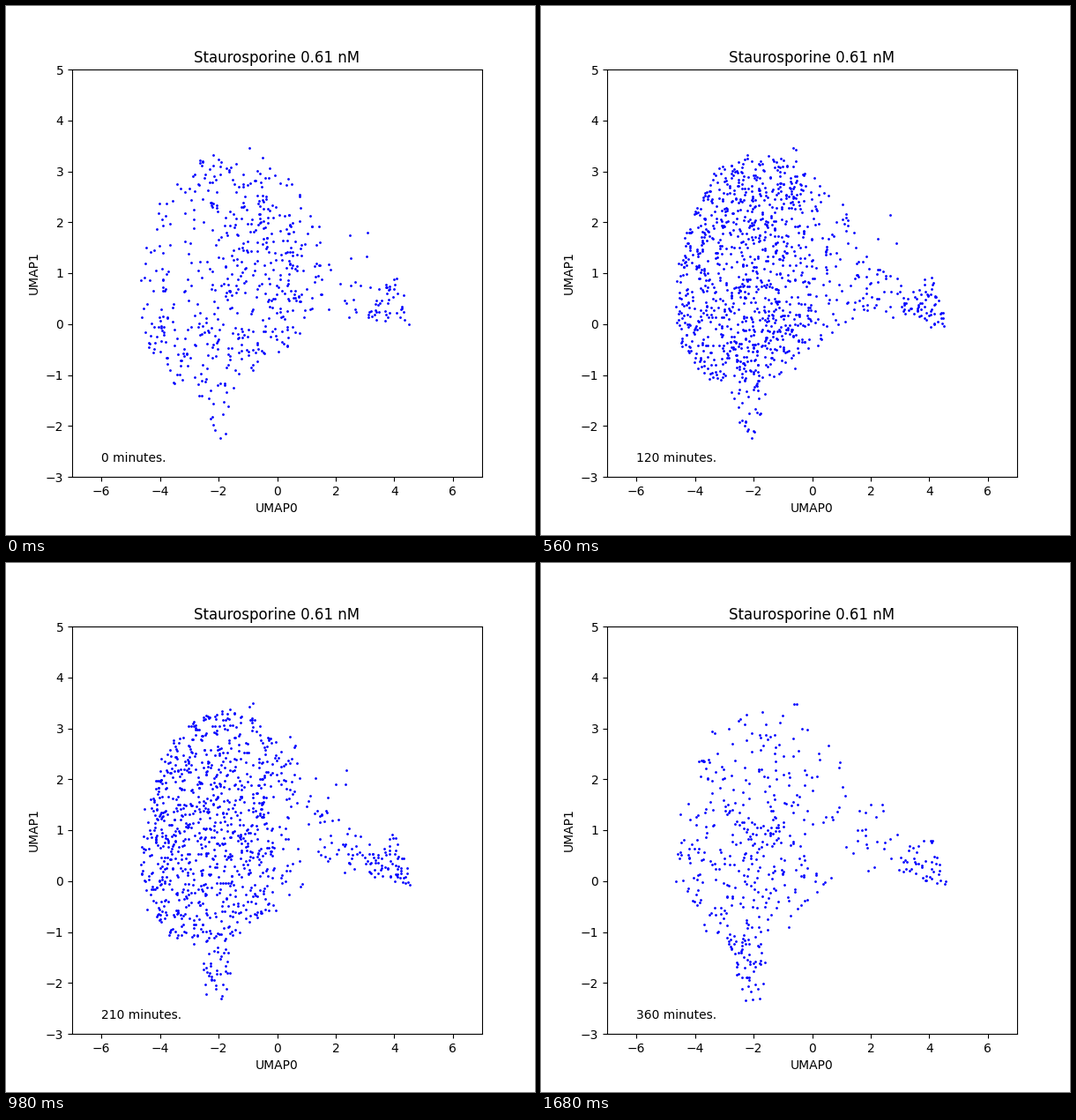
Recreate the animation shown at these times as a matplotlib script. Size 600x600 px, loop 1820 ms.

```python
import numpy as np
import matplotlib.pyplot as plt
from matplotlib.animation import FuncAnimation
from matplotlib.path import Path

FRAMES, INTERVAL = 13, 140
STEP = 30  # minutes per frame
END = STEP * (FRAMES - 1)

BODY = Path([(-4.65, 0.2), (-4.6, 1.2), (-4.05, 2.3), (-3.4, 3.0), (-2.4, 3.3),
             (-0.9, 3.3), (0.5, 2.8), (1.4, 2.0), (1.7, 0.9), (1.2, -0.1),
             (-0.2, -0.6), (-1.2, -1.05), (-3.6, -1.15), (-4.5, -0.4)])
TAIL = Path([(-2.9, -1.1), (-1.5, -1.1), (-1.75, -2.35), (-2.4, -2.3)])
BRIDGE = Path([(1.4, 1.5), (3.2, 0.85), (3.2, 0.2), (1.5, 0.2)])
ARM = Path([(3.0, 0.5), (4.1, 0.95), (4.6, -0.1), (3.1, 0.15)])


def body_weight(p, minute):
    """Thin out the right side over time and the upper left at the start."""
    x, y = p.T
    edge = 1.5 - 1.8 * min(1, minute / 90)
    right = 0.22 + 1 / (1 + np.exp((x - edge) / 0.4))
    hole = np.exp(-((x + 3.2) ** 2 + (y - 1.6) ** 2) / 2)
    return right * (1 - 0.7 * np.exp(-minute / 30) * hole)


def sample(rng, shape, count, weight=None):
    box = shape.get_extents()
    p = rng.uniform(box.min, box.max, (6000, 2))
    p = p[shape.contains_points(p)]
    w = weight(p) if weight else np.ones(len(p))
    p = p[rng.choice(len(p), int(count), replace=False, p=w / w.sum())]
    return p + rng.normal(0, 0.04, p.shape)


def cells(minute):
    rng = np.random.default_rng(100 + minute)
    u = minute / END
    # fewer cells in the first and last hour
    ramp = 0.45 + 0.55 * min(1, minute / 60, (END - minute) / 60)
    return np.vstack([
        sample(rng, BODY, 1140 * (1 - 0.3 * u) * ramp,
               lambda p: body_weight(p, minute)),
        sample(rng, TAIL, 22 + 36 * u),
        sample(rng, BRIDGE, 42 * ramp),
        sample(rng, ARM, 66 * np.sqrt(ramp)),
        rng.uniform((1.2, 1.2), (3.2, 2.2), (4, 2)),  # strays
        rng.normal((-0.7, 3.45), (0.15, 0.07), (2, 2)),
    ])


fig, ax = plt.subplots(figsize=(6, 6), dpi=100)
fig.subplots_adjust(left=0.125, right=0.9, bottom=0.11, top=0.88)
ax.set(xlim=(-7, 7), ylim=(-3, 5), xlabel="UMAP0", ylabel="UMAP1",
       title="Staurosporine 0.61 nM")
dots, = ax.plot([], [], "b.", ms=2)
label = ax.text(-6, -2.7, "")


def update(i):
    minute = i * STEP
    dots.set_data(*cells(minute).T)
    label.set_text(f"{minute} minutes.")
    return dots, label


anim = FuncAnimation(fig, update, frames=FRAMES, interval=INTERVAL,
                     repeat=True, repeat_delay=0)
plt.show()
```
